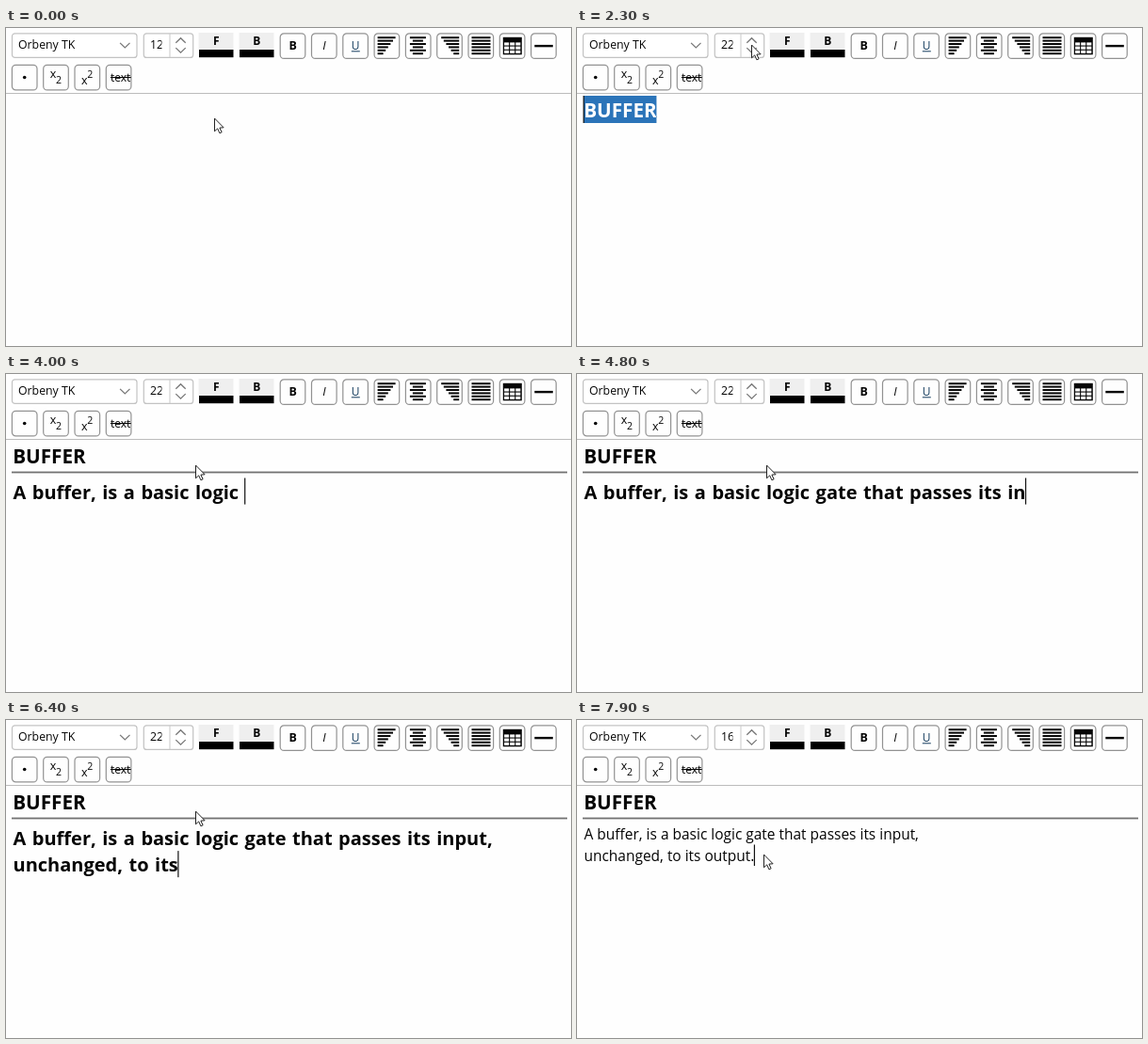
Write an HTML page with a canvas that moves like this. It is 600x338 px and loops after 8 s.

```html
<!DOCTYPE html>
<html lang="en">
<head>
<meta charset="utf-8">
<title>Text editor</title>
<style>
html, body { margin: 0; width: 100%; height: 100%; overflow: hidden; background: #fefefe; }
canvas { display: block; width: 600px; height: 338px; }
</style>
</head>
<body>
<canvas id="stage"></canvas>
<script>
const W = 600, H = 338, LOOP = 8000, STEP = 100;
const canvas = document.getElementById('stage');
const ctx = canvas.getContext('2d');
const dpr = window.devicePixelRatio || 1;
canvas.width = W * dpr;
canvas.height = H * dpr;

const SANS = '"Open Sans", "Noto Sans", sans-serif';
const BLUE = '#2b74b9', INK = '#050505', PAPER = '#fefefe';
const LABEL = '12.3px ' + SANS;
const TITLE = 'BUFFER';
const LINES = ['A buffer, is a basic logic gate that passes its input, ', 'unchanged, to its output.'];
const FIRST = LINES[0].length, TOTAL = LINES.join('').length;
const PITCH = 33.3, SIZE = 26.6;

// pointer moves: start, end, destination
const BOLD = [292, 20], SPIN = [185, 18], RULE = [568, 17], REST = [201, 97];
const ORIGIN = [221, 96];
const MOVES = [
  [500, 900, [364, 95]],
  [900, 1100, [7, 82]],
  [1100, 1500, BOLD],
  [1600, 1800, SPIN],
  [2300, 2600, RULE],
  [2600, 2900, REST],
  [6600, 6800, [8, 122]],
  [6800, 7100, [262, 150]],
  [7100, 7300, [255, 59]],
  [7300, 7400, BOLD],
  [7400, 7500, SPIN],
  [7700, 7900, [198, 143]]
];
// time, characters in the paragraph
const TYPED = [[3060, 0], [4800, 50], [5100, 57], [5400, FIRST], [5500, FIRST], [6400, 72], [6800, TOTAL]];

const unit = (t, a, b) => Math.max(0, Math.min(1, (t - a) / (b - a)));
const ramp = (t, a, b, from, to) => Math.round(from + (to - from) * unit(t, a, b));
const easeOut = u => 1 - (1 - u) ** 2;

function pointerAt(t) {
  let [x, y] = ORIGIN;
  for (const [a, b, to] of MOVES) {
    const u = easeOut(unit(t, a, b));
    x += (to[0] - x) * u;
    y += (to[1] - y) * u;
  }
  return [x, y];
}

function typedAt(t) {
  const i = TYPED.findIndex(k => t <= k[0]);
  if (i < 0) return TOTAL;
  if (i === 0) return 0;
  const [a, from] = TYPED[i - 1], [b, to] = TYPED[i];
  return ramp(t, a, b, from, to);
}

function rect(x, y, w, h, color) {
  ctx.fillStyle = color;
  ctx.fillRect(x, y, w, h);
}

function box(x, y, w, h, r, fill, stroke) {
  ctx.beginPath();
  ctx.roundRect(x, y, w, h, r);
  ctx.fillStyle = fill;
  ctx.fill();
  ctx.strokeStyle = stroke;
  ctx.lineWidth = 1.2;
  ctx.stroke();
}

// dir 1 points down, -1 points up
function chevron(x, y, dir) {
  ctx.beginPath();
  ctx.moveTo(x - 5.2, y - 2.5 * dir);
  ctx.lineTo(x, y + 2.5 * dir);
  ctx.lineTo(x + 5.2, y - 2.5 * dir);
  ctx.strokeStyle = '#777';
  ctx.lineWidth = 1.3;
  ctx.stroke();
}

function text(s, x, y, font, color = INK, align = 'left') {
  ctx.font = font;
  ctx.fillStyle = color;
  ctx.textAlign = align;
  ctx.fillText(s, x, y);
}

function clipped(x, y, w, h, draw) {
  ctx.save();
  ctx.beginPath();
  ctx.rect(x, y, w, h);
  ctx.clip();
  draw();
  ctx.restore();
}

function bars(x, w, align, width) {
  for (let i = 0; i < 6; i++) {
    const n = width(i);
    rect(x + (w - n) * align, 9.2 + i * 3.4, n, 2, INK);
  }
}

function swatch(x, label) {
  rect(x, 5, 37, 18, '#efefef');
  rect(x + 0.5, 23, 36.5, 8.2, '#000');
  text(label, x + 18.7, 18, 'bold 12px ' + SANS, INK, 'center');
}

function table(x, y) {
  rect(x, y, 20, 18.5, INK);
  for (let i = 0; i < 9; i++)
    rect(x + 1.3 + i % 3 * 6.1, y + 5.6 + Math.floor(i / 3) * 4.2, 5, 3.1, '#fff');
}

const stair = i => 19 - 2.6 * i;
const letter = (s, style) => x => text(s, x + 13.4, 23, `${style} 12.4px ${SANS}`, INK, 'center');
const script = (xBase, twoBase) => x => {
  text('x', x + 7, xBase, '12.5px ' + SANS);
  text('2', x + 13.2, twoBase, '10.5px ' + SANS);
};

const UPPER = [
  letter('B', 'bold'),
  letter('I', 'italic'),
  x => {
    text('U', x + 13.4, 22.5, '12px ' + SANS, '#123a5c', 'center');
    rect(x + 9, 24.3, 9, 1, '#123a5c');
  },
  x => bars(x + 3.5, 18, 0, stair),
  x => bars(x + 4, 18, 0.5, i => i % 2 ? 11 : 17),
  x => bars(x + 3.5, 20, 1, stair),
  x => bars(x + 3.5, 20, 0, () => 20),
  x => table(x + 3.5, 9.8),
  x => rect(x + 3.7, 17.9, 19.5, 2.4, INK)
];

const LOWER = [
  x => {
    ctx.beginPath();
    ctx.arc(x + 13.3, 52.5, 1.8, 0, 7);
    ctx.fillStyle = INK;
    ctx.fill();
  },
  script(53, 59),
  script(60, 53),
  x => clipped(x, 39, 26.5, 28, () => {
    text('text', x + 4.6, 56.5, '12px ' + SANS);
    rect(x + 4.6, 52, 22, 1.1, INK);
  })
];

function buttons(icons, x0, y, [px, py]) {
  icons.forEach((draw, i) => {
    const x = x0 + i * PITCH;
    const hot = px >= x && px <= x + SIZE && py >= y && py <= y + SIZE;
    box(x, y, SIZE, SIZE, 4, hot ? '#cbd7ee' : PAPER, hot ? '#85899c' : '#929292');
    draw(x);
  });
}

function toolbar(pt, mouse) {
  box(6.5, 5.8, 132.5, 25.6, 3, '#fff', '#c3c3c3');
  text('Orbeny TK', 13, 22.3, LABEL);
  chevron(126.3, 18.4, 1);

  box(146.3, 5.8, 52.4, 25.6, 3, '#fff', '#c3c3c3');
  rect(173.5, 6, 1, 25, '#c9c9c9');
  clipped(150, 7, 15.5, 23, () => text(String(pt), 153, 22.3, LABEL));
  chevron(185.5, 13.2, -1);
  chevron(185.5, 23.6, 1);

  swatch(204.5, 'F');
  swatch(247.5, 'B');
  buttons(UPPER, 291.2, 5.8, mouse);
  buttons(LOWER, 6.4, 39.3, mouse);
  rect(0, 69, W, 1, '#bcbcbc');
}

function marked(x, y, w, h, draw) {
  rect(x, y, w, h, BLUE);
  clipped(x, y, w, h, () => draw('#fff'));
}

function caret(x, y, h) {
  rect(x, y, 1.2, h, '#111');
}

function title(t, pt) {
  const font = t >= 1600 ? `bold ${pt * 0.94}px ${SANS}` : `${pt * 0.975}px ${SANS}`;
  const s = TITLE.slice(0, Math.floor(t / STEP));
  const draw = color => text(s, 7.2, 73 + pt, font, color);
  const h = 17 + (pt - 12) * 1.2;
  draw(INK);
  const w = ctx.measureText(s).width;
  const selected = t >= 1100 && t < 2400;
  if (selected) marked(7, 72, w, h, draw);
  if (t >= STEP && t < 2600) caret(selected ? 6.5 : 7.3 + w, 72, h);
}

function body(t, pt) {
  const bold = t < 7400, grow = pt - 16;
  const font = bold ? `bold 20px ${SANS}` : `${pt * 0.967}px ${SANS}`;
  const lead = 23 + grow * 0.93;
  const base = 127 + grow * 0.92;
  const top = base - 18 - grow * 0.75;
  const s = LINES.join('').slice(0, typedAt(t));
  const rows = t >= 5500 ? [s.slice(0, FIRST), s.slice(FIRST)] : [s];
  const selected = t < 7800 ? ramp(t, 6800, 7100, 0, TOTAL) : 0;

  ctx.save();
  ctx.font = font;
  ctx.wordSpacing = bold ? '1.3px' : '0px';
  const width = part => ctx.measureText(part).width;

  rows.forEach((row, i) => {
    const draw = color => text(row, 7.5, base + i * lead, font, color);
    draw(INK);
    const part = row.slice(0, Math.max(0, selected - i * FIRST));
    if (part) marked(7, top + i * lead, width(part) + 0.5, lead + 0.3, draw);
  });

  if (!selected) {
    const i = rows.length - 1;
    caret(7 + width(rows[i]), top + i * lead + 0.5, lead - 0.5);
  }
  ctx.restore();
}

const ARROW = new Path2D('M0 0V13.8L3.2 10.9L5.4 15.8L7.6 14.8L5.4 10.1L9.6 9.8Z');

function pointer([x, y]) {
  ctx.save();
  ctx.translate(x + 0.5, y);
  ctx.fillStyle = '#fff';
  ctx.fill(ARROW);
  ctx.strokeStyle = '#222';
  ctx.lineWidth = 1;
  ctx.stroke(ARROW);
  ctx.restore();
}

function render(t) {
  ctx.setTransform(dpr, 0, 0, dpr, 0, 0);
  rect(0, 0, W, H, PAPER);
  const mouse = pointerAt(t);
  const titlePt = ramp(t, 1700, 2300, 12, 22);
  const bodyPt = ramp(t, 7400, 7700, 22, 16);
  toolbar(Math.min(titlePt, bodyPt), mouse);
  title(t, titlePt);
  if (t >= 2600) {
    rect(6, 103.6, 590, 1.8, '#727272');
    body(t, bodyPt);
  }
  pointer(mouse);
}

const start = performance.now();
function tick() {
  const t = (performance.now() - start) % LOOP;
  render(Math.floor(t / STEP) * STEP);
  requestAnimationFrame(tick);
}
tick();
</script>
</body>
</html>
```
